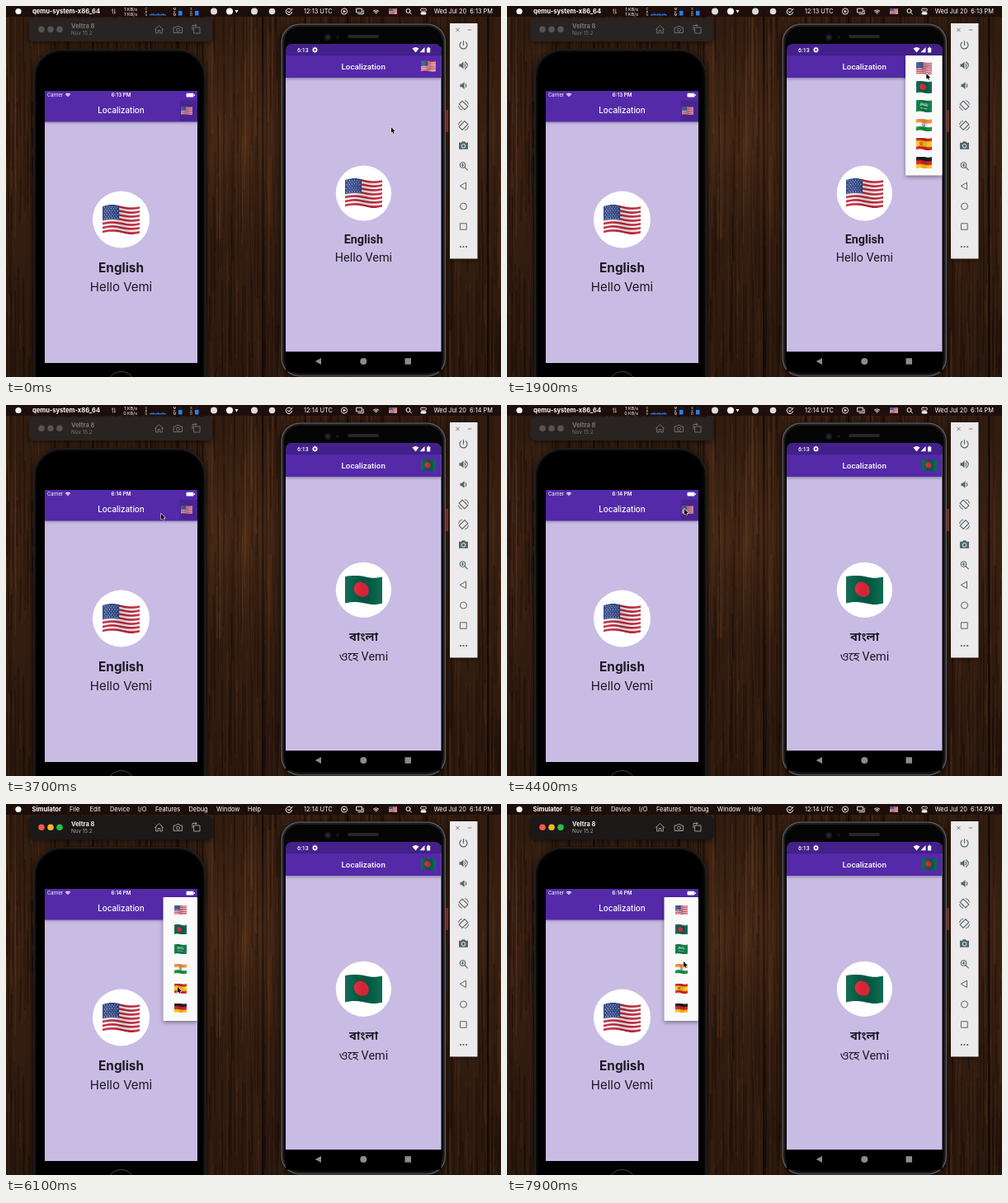
Animation of 600 by 450 pixels, one loop 8 s. Source, as an HTML page with a canvas:

```html
<!DOCTYPE html>
<html lang="en">
<head>
<meta charset="utf-8">
<title>Localization demo</title>
<style>
  html, body { margin: 0; width: 100%; height: 100%; overflow: hidden; background: #1b0d09; }
  canvas { display: block; width: 600px; height: 450px; }
</style>
</head>
<body>
<canvas id="stage"></canvas>
<script>
const LOOP = 8000, STEP = 100;
const SANS = 'Inter, sans-serif';
const ROBOTO = 'Roboto, "Noto Sans Bengali", "Noto Sans", sans-serif';
const PURPLE = '#542aa9', LILAC = '#c9bce4', SLATE = '#52666f', INK = '#1c1822';
const GUEST = 'Vemi';

const stage = document.getElementById('stage');
const dpr = window.devicePixelRatio || 1;
stage.width = 600 * dpr;
stage.height = 450 * dpr;
const ctx = stage.getContext('2d');
ctx.scale(dpr, dpr);
ctx.imageSmoothingQuality = 'high';

const clamp = v => Math.max(0, Math.min(1, v));
const ease = v => v * v * (3 - 2 * v);

function layer(w, h) {
  const c = document.createElement('canvas');
  c.width = w;
  c.height = h;
  return c;
}

// ---------- drawing helpers ----------
function rect(x, y, w, h, color, radius = 0) {
  ctx.fillStyle = color;
  ctx.beginPath();
  ctx.roundRect(x, y, w, h, radius);
  ctx.fill();
}

function disc(x, y, r, color) {
  ctx.fillStyle = color;
  ctx.beginPath();
  ctx.arc(x, y, r, 0, 7);
  ctx.fill();
}

function ring(x, y, r, color, width = 1) {
  ctx.strokeStyle = color;
  ctx.lineWidth = width;
  ctx.beginPath();
  ctx.arc(x, y, r, 0, 7);
  ctx.stroke();
}

function text(str, x, y, size, { color = '#fff', weight = 400, font = SANS, align = 'left' } = {}) {
  ctx.font = `${weight} ${size}px ${font}`;
  ctx.fillStyle = color;
  ctx.textAlign = align;
  ctx.fillText(str, x, y);
}

// Path drawn around (x, y); filled when no line width is given.
function icon(d, x, y, color, width = 0, turn = 0) {
  ctx.save();
  ctx.translate(x, y);
  ctx.rotate(turn);
  ctx.lineCap = ctx.lineJoin = 'round';
  ctx.fillStyle = ctx.strokeStyle = color;
  ctx.lineWidth = width;
  const path = new Path2D(d);
  width ? ctx.stroke(path) : ctx.fill(path);
  ctx.restore();
}

function withShadow(blur, dy, alpha, draw) {
  ctx.save();
  ctx.shadowColor = `rgba(0,0,0,${alpha})`;
  ctx.shadowBlur = blur * dpr;
  ctx.shadowOffsetY = dy * dpr;
  draw();
  ctx.restore();
}

function wifi(x, y, s) {
  ctx.strokeStyle = '#fff';
  ctx.lineWidth = 1.15 * s;
  for (const r of [.8, 2.7, 4.6]) {
    ctx.beginPath();
    ctx.arc(x, y + 2.8 * s, r * s, -2.36, -.78);
    ctx.stroke();
  }
}

// ---------- wooden desk ----------
function makeWood() {
  const c = layer(600, 450), g = c.getContext('2d');
  let seed = 11;
  const rnd = () => (seed = seed * 16807 % 2147483647) / 2147483647;
  g.fillStyle = '#382012';
  g.fillRect(0, 0, 600, 450);
  for (let i = 0; i < 1700; i++) {
    const x = rnd() * 600, y = rnd() * 560 - 110, len = 30 + rnd() * 200, bend = rnd() * 5 - 2.5;
    g.strokeStyle = rnd() < .58 ? `rgba(12,5,2,${.08 + rnd() * .26})` : `rgba(128,78,42,${.05 + rnd() * .19})`;
    g.lineWidth = .6 + rnd() * 1.8;
    g.beginPath();
    g.moveTo(x, y);
    g.bezierCurveTo(x + bend, y + len * .3, x - bend, y + len * .7, x + bend * .4, y + len);
    g.stroke();
  }
  g.fillStyle = 'rgba(8,3,1,.6)';
  for (const x of [104, 207, 310, 413, 583]) g.fillRect(x, 0, 2.5, 450);
  const glow = g.createRadialGradient(280, 160, 10, 280, 160, 130);
  glow.addColorStop(0, 'rgba(130,78,40,.2)');
  glow.addColorStop(1, 'rgba(130,78,40,0)');
  g.fillStyle = glow;
  g.fillRect(0, 0, 600, 450);
  const shade = g.createLinearGradient(0, 0, 0, 450);
  shade.addColorStop(0, 'rgba(0,0,0,.12)');
  shade.addColorStop(.35, 'rgba(0,0,0,0)');
  shade.addColorStop(1, 'rgba(0,0,0,.25)');
  g.fillStyle = shade;
  g.fillRect(0, 0, 600, 450);
  return c;
}

// ---------- flags ----------
const FW = 120, FH = 86, WAVE = 4;

function bands(g, colors, sizes) {
  let y = 0;
  colors.forEach((color, i) => {
    const h = FH * (sizes ? sizes[i] : 1 / colors.length);
    g.fillStyle = color;
    g.fillRect(0, y, FW, h + .5);
    y += h;
  });
}

function dot(g, x, y, r, color) {
  g.fillStyle = color;
  g.beginPath();
  g.arc(x, y, r, 0, 7);
  g.fill();
}

const flagArt = {
  us(g) {
    bands(g, Array.from({ length: 13 }, (_, i) => i % 2 ? '#f3eff0' : '#bd2337'));
    g.fillStyle = '#2f4584';
    g.fillRect(0, 0, 54, FH * 7 / 13);
    for (let row = 0; row < 7; row++)
      for (let col = 0; col < 6 - row % 2; col++)
        dot(g, 6 + col * 8.4 + row % 2 * 4.2, 5 + row * 6.1, 1.5, '#e0e4f2');
  },
  bd(g) {
    bands(g, ['#056149']);
    dot(g, 53, 43, 24, '#ee2a40');
  },
  sa(g) {
    bands(g, ['#0b7a45']);
    g.strokeStyle = '#fff';
    g.lineWidth = 4;
    g.stroke(new Path2D('M30 40q6 8 9-8q3 14 9 4q4-20 7 2q6 6 9-10q4 20 10 8q5-16 8 4q6 4 8-16M36 24h16M66 22h18M34 61h52M40 57v8'));
  },
  in(g) {
    bands(g, ['#f58d35', '#fafafa', '#138b3c']);
    g.strokeStyle = '#35458f';
    g.lineWidth = 3;
    g.beginPath();
    g.arc(60, 43, 10, 0, 7);
    g.stroke();
    dot(g, 60, 43, 3, '#35458f');
  },
  es(g) {
    bands(g, ['#cc2029', '#fcc515', '#cc2029'], [.25, .5, .25]);
    g.fillStyle = '#ad4a32';
    g.fillRect(29, 32, 20, 23);
    g.fillStyle = '#e4b49b';
    g.fillRect(34, 38, 10, 9);
  },
  de(g) { bands(g, ['#1b1b1b', '#d5202b', '#f8c51d']); }
};

function makeFlag(paint) {
  const flat = layer(FW, FH), waved = layer(FW, FH + 2 * WAVE);
  paint(flat.getContext('2d'));
  const g = waved.getContext('2d');
  for (let x = 0; x < FW; x++) {
    const phase = x / FW * 6.1, y = WAVE - WAVE * Math.sin(phase);
    g.drawImage(flat, x, 0, 1, FH, x, y, 1, FH);
    const light = Math.cos(phase);
    g.fillStyle = light > 0 ? `rgba(255,255,255,${light * .06})` : `rgba(0,0,0,${-light * .12})`;
    g.fillRect(x, y, 1, FH);
  }
  return waved;
}

const codes = Object.keys(flagArt);
const flags = {};
for (const code of codes) flags[code] = makeFlag(flagArt[code]);

function flag(code, x, y, w) {
  const h = w * (FH + 2 * WAVE) / FW;
  ctx.drawImage(flags[code], x - w / 2, y - h / 2, w, h);
}

// ---------- shared app parts ----------
function popup(x, y, w, h, firstY, pitch, flagW, age, alpha) {
  if (age < 0 || alpha <= 0) return;
  ctx.save();
  ctx.globalAlpha = alpha;
  withShadow(5, 2, .4, () => rect(x, y, w, h * clamp(age / 100), '#fafafa', 1));
  codes.forEach((code, i) => {
    ctx.globalAlpha = alpha * clamp((age - 60 - i * 45) / 40);
    flag(code, x + w / 2, firstY + i * pitch, flagW);
  });
  ctx.restore();
}

function appBody(x, y, w, h, barTop, barBottom) {
  rect(x, y, w, h, LILAC, [5, 5, 0, 0]);
  ctx.save();
  ctx.beginPath();
  ctx.rect(x, y, w, h);
  ctx.clip();
  withShadow(3.5, 1.5, .35, () => rect(x, barTop, w, barBottom - barTop, PURPLE));
  ctx.restore();
}

// ---------- desktop ----------
function menuBar(active, minute) {
  rect(0, 0, 600, 13, '#1d0e0a');
  disc(15, 6.5, 3.6, '#fff');
  if (active) {
    text('Simulator', 31.5, 9.3, 7.6, { weight: 700 });
    const items = { File: 77, Edit: 101.5, Device: 126, 'I/O': 160, Features: 181, Debug: 221.5, Window: 255, Help: 293 };
    for (const name in items) text(name, items[name], 9.3, 7.4);
  } else {
    text('qemu-system-x86_64', 32, 9.3, 7.6, { weight: 700 });
    icon('M-1.2 2.5V-2.5M-2-1.5L-1.2-2.5M1.2-2.5V2.5M2 1.5L1.2 2.5', 130.5, 6.5, '#ddd', .7);
    text('1 KB/s', 159, 6, 5.4, { align: 'right' });
    text((minute > 13 ? 0 : 1) + ' KB/s', 159, 12, 5.4, { align: 'right' });
    [['CPU', 170], ['MEM', 204.5], ['SSD', 224.5]].forEach(([label, x]) =>
      [...label].forEach((ch, i) => text(ch, x, 4.7 + i * 3.8, 3.8, { align: 'center' })));
    for (let i = 0; i < 10; i++) rect(174 + i * 2, 10 - i % 3 * .4, 1.6, 1.5 + i % 3 * .4, '#2f7cf0');
    for (const x of [209, 229]) {
      rect(x, 2, 4.5, 9.5, '#101b33');
      rect(x, 6, 4.5, 5.5, '#2f7cf0');
    }
    disc(252, 6.5, 4, '#ddd');
    disc(271, 6.5, 4, '#fff');
    icon('M-2-1.5H2L0 2Z', 279.5, 6.5, '#fff');
    disc(301, 6.5, 4, '#ddd');
    disc(322.5, 6.5, 3.8, '#ddd');
  }
  icon('M2.8-2.3A3.7 3.7 0 1 0 3.6 1M-1.5-.3L0 1.3L4-3.2', 343, 6.7, '#fff', 1);
  text(`12:${minute} UTC`, 361, 9.3, 7.4);
  ring(410, 6.5, 3.6, '#fff', .9);
  icon('M-1.2-1.8L2 0L-1.2 1.8Z', 410, 6.5, '#fff');
  icon('M-4-3.3H2.4V1.3H-4ZM-2 3.2H4.2V-1.5', 429, 6.5, '#fff', .9);
  wifi(448.5, 6.8, 1);
  flag('us', 469, 6.5, 9.5);
  icon('M2 0A2.5 2.5 0 1 1-3 0A2.5 2.5 0 1 1 2 0M1.3 1.7L3.4 3.8', 488, 6, '#fff', 1);
  icon('M-2-3.5H2A1.5 1.5 0 0 1 2-.5H-2A1.5 1.5 0 0 1-2-3.5', 506, 6.7, '#fff', .8);
  rect(502.5, 7.3, 7, 3.2, '#fff', 1.6);
  text(`Wed Jul 20  6:${minute} PM`, 590, 9.3, 7.4, { align: 'right' });
}

function simulatorTitle(active) {
  withShadow(6, 2, .5, () => rect(28, 14.5, 222, 28.5, active ? '#1b1817' : '#292321', 5));
  const lights = active ? ['#f4584f', '#f2b62e', '#2bbf40'] : ['#595350', '#595350', '#595350'];
  lights.forEach((color, i) => disc(43 + i * 11, 28.3, 3.8, color));
  const tint = active ? '#aaa7a5' : '#7a7471';
  text('Veltra 8', 79, 27, 7.5, { weight: 700, color: active ? '#f3f1f0' : tint });
  text('Nuv 15.2', 79, 35, 6.3, { color: tint });
  icon('M-5 0L0-4.8L5 0M-3.8-1V4.5H-1.2V1H1.2V4.5H3.8V-1', 185.5, 28.5, tint, .9);
  icon('M-5-2.5H-2.4L-1.4-4H1.4L2.4-2.5H5V4H-5ZM2 .6A2 2 0 1 1-2 .6A2 2 0 1 1 2 .6', 208.5, 28.5, tint, .9);
  icon('M-3-2H4V5H-3ZM-5 1V-4.5H0M-1.5-6L0-4.5L-1.5-3', 231, 28, tint, .9);
}

function leftPhone(t, active, minute) {
  for (const y of [116, 149, 181]) rect(31.5, y, 3, y === 116 ? 14 : 23, '#17110f', 1);
  withShadow(8, 2, .6, () => rect(33, 52, 209.5, 430, '#211d1b', 34));
  rect(35, 54, 205.5, 430, '#0b0a0a', 32);
  rect(37, 56, 201.5, 430, '#000', 30);
  ring(139.5, 460, 16.5, '#4a4746', 1);

  appBody(47, 103, 185, 330, 103, 140.5);
  text('Carrier', 50, 110.2, 5.8);
  wifi(75, 107.8, .9);
  text(`6:${minute} PM`, 139.5, 110.2, 6.2, { weight: 600, align: 'center' });
  rect(218.5, 105.8, 9, 4.6, '#fff', 1.2);
  rect(228, 107.2, 1, 1.8, '#fff');
  text('Localization', 139.5, 130.3, 9.8, { weight: 500, align: 'center' });
  const pressed = t >= 5100;
  rect(210.5, 114.5, 21.5, 25, pressed ? 'rgba(255,255,255,.09)' : 'rgba(0,0,0,.14)');
  ctx.globalAlpha = pressed ? .7 : .86;
  flag('us', 218.5, 127, 14);
  ctx.globalAlpha = 1;

  disc(139.5, 259, 34.5, '#fff');
  flag('us', 139.5, 259, 45);
  text('English', 139.5, 323.2, 15.3, { weight: 700, color: INK, align: 'center' });
  text('Hello ' + GUEST, 139.5, 346, 15, { color: INK, align: 'center' });
  popup(190.5, 113, 41.5, 150, 128.5, 23.8, 15, t - 5200, 1);
}

// Bengali words, with a stroked version for systems that lack the script.
ctx.font = `700 40px ${ROBOTO}`;
const hasBengali = ctx.measureText('ব').width !== ctx.measureText('\u0984').width;

function bengaliGreeting() {
  const centered = { color: INK, font: ROBOTO, align: 'center' };
  if (hasBengali) {
    text('বাংলা', 433.5, 285.5, 14.3, { ...centered, weight: 700 });
    text('ওহে ' + GUEST, 433.5, 309.8, 14.4, centered);
    return;
  }
  icon('M0 0H15M21 0H35M8 0V9L1 5L8 1M12.5 0V9M16 2.5a1.8 1.8 0 1 0 3.6 0a1.8 1.8 0 1 0-3.6 0M16 9L20 5.5M29 0V9M23 7q-2-4 1-4q2 0 2 4q0-4 3-4M33.5 0V9',
    416, 276.5, INK, 1.7);
  icon('M1 1q2-2 5 0q3 2 0 4q-4 1-4-1M6 5q5 1 3 5q-4 3-7-2M9 0q2-3 1-4M12 0H25M15 0q-3 3-2 8q1 2 2 0M18 0V4Q24 2 23 6Q22 8 19 6L23 10',
    404, 299.5, INK, 1.1);
  text(GUEST, 430.5, 309.8, 14.4, { color: INK, font: ROBOTO });
}

function rightPhone(t) {
  const bengali = t >= 3000;
  rect(532, 126, 4, 27, '#a53a35', 1);
  rect(532, 178, 3, 50, '#2c2c2e', 1);
  withShadow(8, 2, .6, () => rect(333.5, 21.5, 199.5, 428, '#5a5a5c', 22));
  rect(334.8, 22.8, 196.9, 425.4, '#1c1c1e', 21);
  rect(337, 25, 192.5, 421, '#050505', 19);
  rect(414, 35, 38, 4, '#262628', 2);
  disc(390, 38, 4, '#17181b');
  disc(390, 38, 1.8, '#292d38');
  disc(402, 38, 2, '#141416');

  appBody(339, 46, 188.5, 373.5, 60, 87);
  rect(339, 46, 188.5, 14, '#050505');
  rect(339, 46, 188.5, 14.2, '#43208a', [7, 7, 0, 0]);
  text('6:13', 353, 55.8, 7, { font: ROBOTO, weight: 500 });
  ring(374.5, 53.2, 1.9, '#fff', 1.4);
  for (let i = 0; i < 8; i++) icon('M0-2.5V-3.2', 374.5, 53.2, '#fff', 1, i * Math.PI / 4);
  icon('M-4-2Q0-5 4-2L0 3Z', 496.5, 53.5, '#fff');
  icon('M3-3.3V3H-3Z', 504.5, 53.2, '#fff');
  rect(510, 50.7, 4.2, 5.8, '#fff', .6);
  rect(511.2, 49.8, 1.8, 1, '#fff');
  text('Localization', 433.2, 76.7, 9.8, { font: ROBOTO, weight: 500, align: 'center' });
  flag(bengali ? 'bd' : 'us', 512, 73, 18);

  const cy = bengali ? 224.3 : 227;
  disc(433.4, cy, 33.6, '#fff');
  flag(bengali ? 'bd' : 'us', 433.4, cy, 45);
  if (bengali) bengaliGreeting();
  else {
    const style = { font: ROBOTO, color: INK, align: 'center' };
    text('English', 433.4, 288, 14.3, { ...style, weight: 700 });
    text('Hello ' + GUEST, 433.4, 309.8, 14.4, style);
  }

  rect(339, 419.5, 188.5, 24, '#000');
  icon('M3.5-4V4L-3.8 0Z', 378.5, 431, '#8b8b8b');
  disc(433.3, 431, 4, '#8b8b8b');
  rect(483.5, 427.2, 7.5, 7.5, '#8b8b8b');
  popup(483, 60, 44.5, 145.5, 75.5, 22.9, 19, t - 1000, 1 - clamp((t - 2950) / 200));
}

function emulatorTools() {
  withShadow(5, 1, .5, () => rect(538, 21, 33.5, 285.5, '#eceaea'));
  const x = 554.5, speaker = 'M-5-1.8H-2.8L0-4.4V4.4L-2.8 1.8H-5Z';
  icon('M-1.8-1.8L1.8 1.8M1.8-1.8L-1.8 1.8', 547.5, 29, SLATE, .8);
  icon('M-1.8 0H1.8', 562, 29, SLATE, .8);
  icon('M0-5V0M-2.8-3.6A4.5 4.5 0 1 0 2.8-3.6', x, 47.5, SLATE, 1.2);
  icon(speaker, x, 72, SLATE);
  icon('M1.5-2Q3 0 1.5 2M2-4.2Q7.5 0 2 4.2', x, 72, SLATE, 1.1);
  icon(speaker, x + 1, 96.5, SLATE);
  icon('M2.5-2Q4.2 0 2.5 2', x, 96.5, SLATE, 1.1);
  for (const [y, side] of [[120.5, -1], [145, 1]]) {
    icon('M-2.8-4.8H2.8V4.8H-2.8Z', x, y, SLATE, 1.1, side * Math.PI / 4);
    const arcs = side < 0 ? 'M2-5.8Q5.5-5 6-1.5M-2 5.8Q-5.5 5-6 1.5' : 'M-2-5.8Q-5.5-5-6-1.5M2 5.8Q5.5 5 6 1.5';
    icon(arcs, x, y, SLATE, 1);
  }
  icon('M-5.5-3.5H-2.6L-1.6-5H1.6L2.6-3.5H5.5V4.5H-5.5Z', x, 169.3, SLATE);
  ring(x, 169.8, 2.3, '#eceaea', 1);
  icon('M2.3-1A3.3 3.3 0 1 1-4.3-1A3.3 3.3 0 1 1 2.3-1M1.4 1.4L4.8 4.8M-2.5-1H.5M-1-2.5V.5', x, 194, SLATE, 1.1);
  icon('M3-4V4L-4 0Z', x, 218.5, SLATE, 1);
  ring(x, 243, 4, SLATE, 1);
  icon('M-3.7-3.7H3.7V3.7H-3.7Z', x, 267.5, SLATE, 1);
  for (const dx of [-3.6, 0, 3.6]) disc(x + dx, 292, 1.1, SLATE);
}

// ---------- pointer ----------
const pointerPath = [
  [0, 467, 147], [200, 467, 147], [900, 509, 74], [1600, 509, 74], [2400, 507, 99], [2950, 507, 99],
  [3700, 188, 132], [4400, 215, 126], [5400, 215, 126], [6100, 208, 222], [6700, 208, 222],
  [7800, 214, 191], [LOOP, 214, 191]
];

function pointer(t) {
  const i = pointerPath.findIndex(([end]) => end > t);
  const [t0, x0, y0] = pointerPath[i - 1], [t1, x1, y1] = pointerPath[i];
  const k = ease((t - t0) / (t1 - t0));
  const x = x0 + (x1 - x0) * k, y = y0 + (y1 - y0) * k;
  const arrow = 'M0 0V6.8L1.6 5.4L2.6 7.7L3.7 7.2L2.7 5H4.8Z';
  icon(arrow, x, y, '#fff', 1);
  icon(arrow, x, y, '#000');
}

const wood = makeWood();

function draw(now) {
  const t = Math.floor(now % LOOP / STEP) * STEP;
  const minute = t < 2000 ? 13 : 14, active = t >= 4500;
  ctx.drawImage(wood, 0, 0, 600, 450);
  menuBar(active, minute);
  simulatorTitle(active);
  leftPhone(t, active, minute);
  rightPhone(t);
  emulatorTools();
  pointer(t);
}

const start = performance.now();
function tick() {
  draw(performance.now() - start);
  requestAnimationFrame(tick);
}
tick();
</script>
</body>
</html>
```
